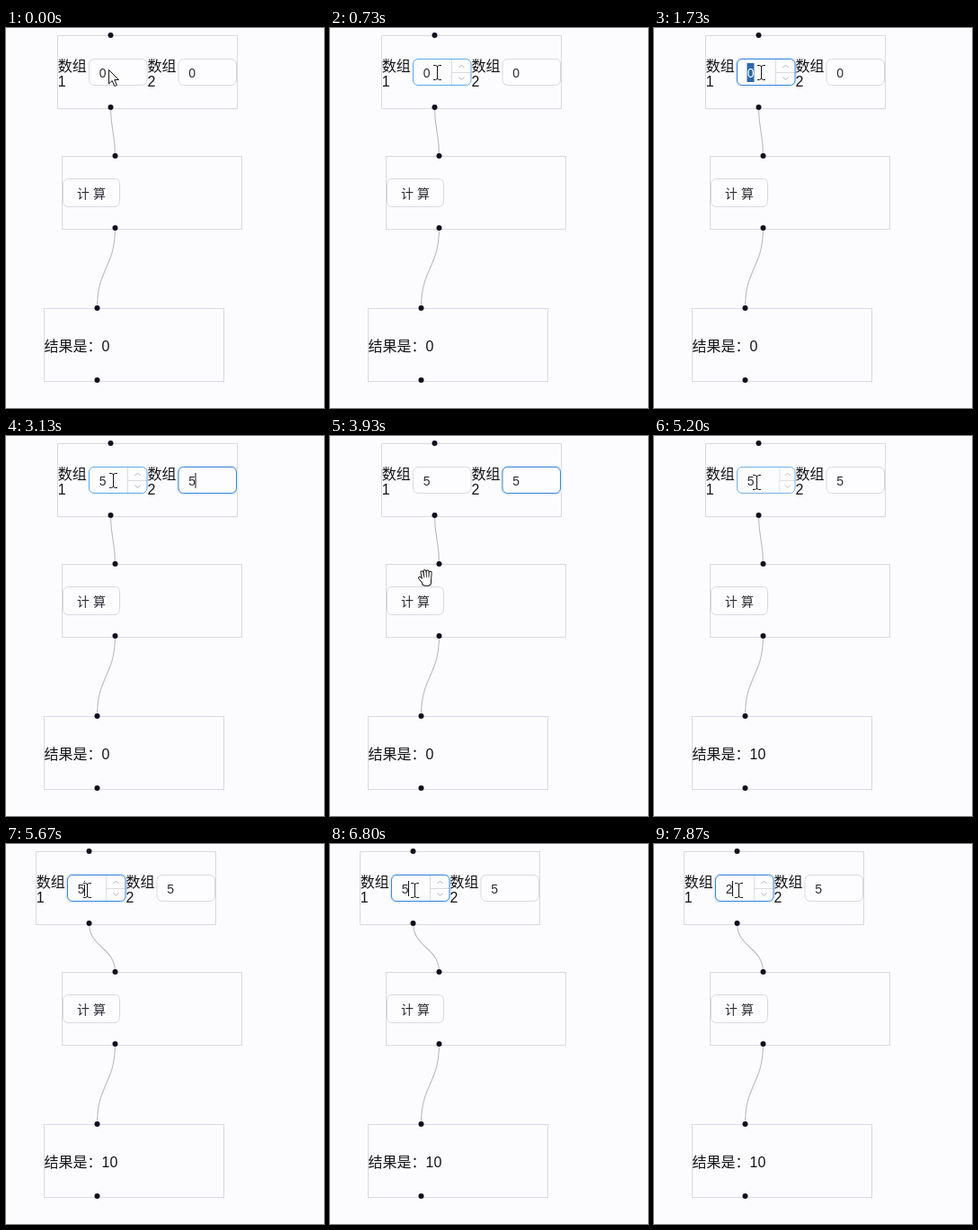
Write an HTML page that moves like this. It is 354 px wide and 422 px high and loops after 8000 ms.

```html
<!DOCTYPE html>
<html lang="zh-CN">
<head>
<meta charset="utf-8">
<title>节点计算</title>
<style>
  html, body { margin: 0; width: 100%; height: 100%; overflow: hidden; background: #fcfcff; }
  svg { display: block; font-family: "Liberation Sans", "Noto Sans CJK SC", "Noto Sans CJK", sans-serif; fill: #141418; }
  .label { font-size: 16px; }
  .field { font-size: 14px; fill: #2c2c32; }
  .node { fill: none; stroke: #b4b4c6; stroke-dasharray: 1 1; }
  .edge { fill: none; stroke: #b9b9c8; stroke-width: 1.1; }
  .box { fill: #fdfdff; }
  .ring { fill: none; stroke: #dcebfb; stroke-width: 2; }
  .rule { fill: none; stroke: #dadae2; }
  .chevron { fill: none; stroke: #b4b4be; }
  .outline { fill: none; stroke: #111; stroke-linecap: round; }
  .halo { fill: none; stroke: #fff; stroke-linecap: round; }
</style>
</head>
<body>
<svg id="stage" width="354" height="422" viewBox="0 0 354 422"></svg>
<script>
const LOOP = 8, FPS = 15, BLINK = .53;
const stage = document.getElementById('stage');
const IDLE = '#d8d8e2', HOVER = '#5ca6e6', FOCUS = '#3c86d8', INK = '#2c2c32';

// What the visitor does, in seconds.
const enter = .45, click = .85, select = 1.72, typeFirst = 2.05, tab = 2.32, typeSecond = 3.12,
  leave = 3.65, compute = 4.58, reenter = 5, refocus = 5.32, drag = 5.47, drop = 5.66,
  nudge = 6.35, nudgeAgain = 6.74, reselect = 7.45, retype = 7.85;

// Progress from 0 to 1 after a start time.
const ramp = (t, start, length = .2) => Math.min(1, Math.max(0, (t - start) / length));
const pulse = (t, on, off) => ramp(t, on) - ramp(t, off);
const between = (t, from, to) => t >= from && t < to;
const blink = (t, from, to) => between(t, from, to) && (t - from) % (2 * BLINK) < BLINK;
const mix = (a, b, k) => `color-mix(in srgb, ${b} ${k * 100}%, ${a})`;
const text = (x, y, kind, content, fill = '') =>
  `<text x="${x}" y="${y}" class="${kind}" style="${fill && `fill:${fill}`}">${content}</text>`;

function node(x, y, content) {
  const dot = dy => `<circle cx="59.5" cy="${dy}" r="3" fill="#10101e"/>`;
  return `<g transform="translate(${x} ${y})">
    <rect class="node" x=".5" y=".5" width="200" height="81"/>${content}${dot(0)}${dot(80)}</g>`;
}

function edge(x1, y1, x2, y2) {
  const mid = (y1 + y2) / 2;
  return `<path class="edge" d="M${x1} ${y1}C${x1} ${mid} ${x2} ${mid} ${x2} ${y2}"/>`;
}

function spinner(open) {
  const left = 65.5 - 22 * open, mid = 65.5 - 11 * open;
  return `<g opacity="${open}">
    <path class="rule" d="M${left} .5V29.5M${left} 15.5H65"/>
    <path class="chevron" d="M${mid - 3} 10l3-3 3 3M${mid - 3} 20.5l3 3 3-3"/></g>`;
}

function numberInput(x, { value, hover, focus, selected, caret }) {
  const border = mix(mix(IDLE, HOVER, hover), FOCUS, focus);
  return `<g transform="translate(${x} 26)">
    <rect class="ring" x="-.5" y="-.5" width="66.5" height="31" rx="6.5" opacity="${focus}"/>
    <rect class="box" x=".5" y=".5" width="64.5" height="29" rx="5.5"/>
    ${spinner(hover)}
    <rect style="fill:none;stroke:${border}" x=".5" y=".5" width="64.5" height="29" rx="5.5"/>
    ${selected ? '<rect x="11.5" y="5" width="8" height="21" fill="#2c68a8"/>' : ''}
    ${text(11.7, 21, 'field', value, selected ? '#fff' : '')}
    ${caret ? '<rect x="19" y="7" width="1" height="17"/>' : ''}</g>`;
}

function button(hot) {
  return `<rect class="box" x="1.5" y="25.5" width="63" height="31" rx="5.5" style="stroke:${mix(IDLE, HOVER, hot)}"/>`
    + text(17, 47, 'field', '计 算', mix(INK, HOVER, hot));
}

// A hand is a palm with four parallel fingers and a thumb, outlined as one shape.
function hand(finger, thumb, palm) {
  const lines = [0, 1, 2, 3].map(finger).join('') + thumb;
  return `<rect ${palm} class="outline" stroke-width="2"/>
    <path class="outline" stroke-width="3.8" d="${lines}"/>
    <path class="halo" stroke-width="1.9" d="${lines}"/><rect ${palm} fill="#fff"/>`;
}

const beam = 'M-3.5-7.5h2l2 1 2-1h2M.5-6.5v14M-3.5 8.5h2l2-1 2 1h2';
const cursors = {
  arrow: '<path fill="#fff" stroke="#111" d="M.5.5v15.500l3.700-3.500 2.600 6 2.600-1-2.600-6h4.700z"/>',
  beam: `<path class="halo" stroke-width="3" d="${beam}"/><path class="outline" d="${beam}"/>`,
  pointer: hand(i => `M${.2 + 2.7 * i} 13V${i ? 7 + .6 * i : 1.8}`, 'M-1 15l-3.500-4',
    'x="-1.5" y="11" width="10.5" height="10" rx="3"'),
  grab: hand(i => `M${2.4 * i - 3} 2L${3.1 * i - 4.6} ${Math.abs(i - 1.4) * 1.2 - 7.5}`, 'M-3 5l-4-4.500',
    'x="-4" y="0" width="9" height="8.5" rx="3"')
};

function cursor(t) {
  const away = ramp(t, leave, .28), onto = ramp(t, leave + .28, .5);
  const back = ramp(t, compute + .05, .55);
  const x = 114 + 5 * ramp(t, enter, .27) - 12 * away + 7 * back
    - 24 * ramp(t, drag, drop - drag) + 3 * ramp(t, nudge, .04) + ramp(t, nudgeAgain, .04);
  const y = 46 + 3 * ramp(t, enter, .27) + 108 * away + 37 * onto - 143 * back;
  const kind = t < enter ? 'arrow' : y < 64 ? 'beam' : y > 167 ? 'pointer' : 'grab';
  return `<g transform="translate(${x} ${y})">${cursors[kind]}</g>`;
}

function scene(t) {
  const firstX = 57 - 24 * ramp(t, drag, drop - drag);
  const first = {
    value: t < typeFirst ? 0 : t < retype ? 5 : 2,
    hover: pulse(t, enter, leave) + ramp(t, reenter, .25),
    focus: pulse(t, click, tab) + ramp(t, refocus),
    selected: between(t, select, typeFirst) || between(t, reselect, retype),
    caret: blink(t, click, select) || blink(t, typeFirst, tab) || blink(t, drop, reselect) || blink(t, retype, LOOP)
  };
  const second = {
    value: t < typeSecond ? 0 : 5,
    hover: 0,
    focus: pulse(t, tab, compute),
    selected: between(t, tab, typeSecond),
    caret: blink(t, typeSecond, compute - .15)
  };
  const label = (x, number) => text(x, 40, 'label', '数组') + text(x, 57, 'label', number);

  return edge(firstX + 59.5, 88, 121.5, 142)
    + edge(121.5, 222, 101.5, 311)
    + node(firstX, 8, label(.8, 1) + numberInput(35, first) + label(100.5, 2) + numberInput(134.5, second))
    + node(62, 142, button(pulse(t, leave + .4, compute + .1)))
    + node(42, 311, text(.5, 48, 'label', '结果是：' + (t < compute ? 0 : 10)))
    + cursor(t);
}

let shown = -1;
function draw() {
  // The small lead absorbs rounding at step boundaries.
  const step = Math.floor((performance.now() + 4) / 1000 % LOOP * FPS);
  if (step !== shown) stage.innerHTML = scene((shown = step) / FPS);
  requestAnimationFrame(draw);
}
draw();
</script>
</body>
</html>
```
